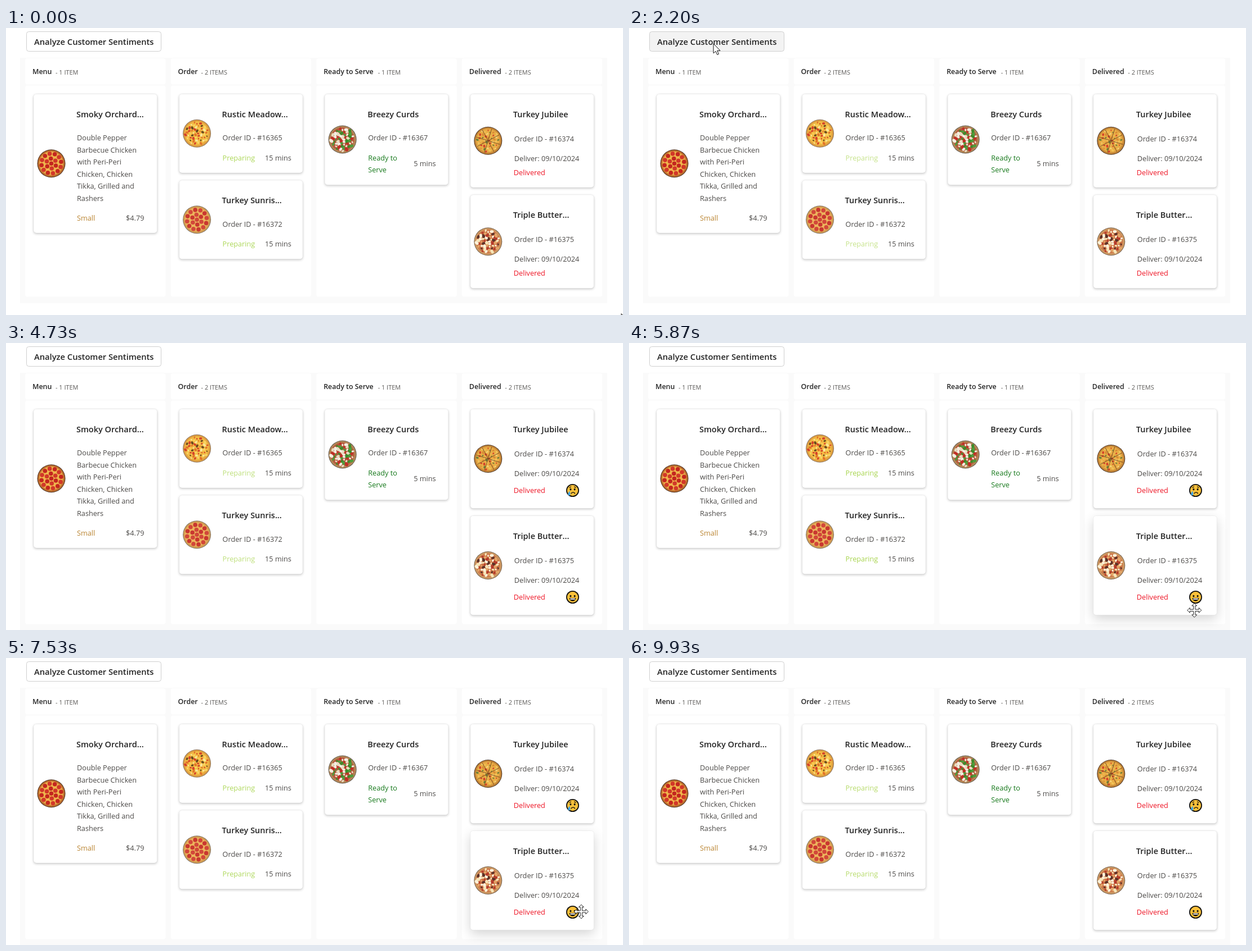
These frames come from a looping animation (1096x511 px, 10000 ms). An HTML page with a canvas:

```html
<!DOCTYPE html>
<html lang="en">
<head>
<meta charset="utf-8">
<title>Order board</title>
<style>
  html, body { margin: 0; width: 100%; height: 100%; overflow: hidden; background: #fff; }
  canvas { display: block; }
</style>
</head>
<body>
<canvas id="stage" width="1096" height="511"></canvas>
<script>
const ctx = document.getElementById('stage').getContext('2d');
const LOOP = 10000, ANALYZE_AT = 2300, RESULT_AT = 4500;
const FAMILY = '"Open Sans", "Noto Sans", sans-serif';
const INK = '#242424', BODY = '#4c4a48', LIME = '#9acd32', GREEN = '#17791c', RED = '#ee1525';
const COLUMN_STEP = 258.6, CARD_X = 49, CARD_W = 219.5;

const columns = [['Menu', '- 1 ITEM', 88], ['Order', '- 2 ITEMS', 88],
  ['Ready to Serve', '- 1 ITEM', 143.5], ['Delivered', '- 2 ITEMS', 110.5]];

// time, x, y of the pointer's hot spot
const pointerPath = [
  [0, 1094, 509], [600, 520, 320], [900, 230, 190], [1070, 170, 82], [1330, 175, 46],
  [1650, 150, 28], [2250, 150, 28], [2700, -20, 60], [2701, 1000, 560], [5700, 1000, 540],
  [5900, 1005, 465], [6200, 1010, 440], [6500, 1020, 275], [7000, 1020, 275],
  [7300, 1028, 440], [7600, 1020, 455], [7900, 1000, 540], [LOOP, 1000, 560]
];

function pointerAt(t) {
  const i = pointerPath.findIndex(p => p[0] > t);
  const [t0, x0, y0] = pointerPath[i - 1], [t1, x1, y1] = pointerPath[i];
  const k = (t - t0) / (t1 - t0);
  return { x: x0 + (x1 - x0) * k, y: y0 + (y1 - y0) * k };
}

const inside = (p, x, y, w, h) => p.x >= x && p.x <= x + w && p.y >= y && p.y <= y + h;

function box(x, y, w, h, r, fill, stroke) {
  ctx.beginPath();
  ctx.roundRect(x, y, w, h, r);
  if (fill) { ctx.fillStyle = fill; ctx.fill(); }
  if (stroke) { ctx.strokeStyle = stroke; ctx.lineWidth = 1; ctx.stroke(); }
}

function text(str, x, y, color = BODY, size = 12.7, weight = 400) {
  ctx.font = `${weight} ${size}px ${FAMILY}`;
  ctx.fillStyle = color;
  ctx.fillText(str, x, y);
}

function disc(x, y, r, fill, squash = 1, angle = 0) {
  ctx.beginPath();
  ctx.ellipse(x, y, r, r * squash, angle, 0, 7);
  ctx.fillStyle = fill;
  ctx.fill();
}

function outline(points, fill, stroke, width = 1) {
  ctx.beginPath();
  points.forEach(([x, y]) => ctx.lineTo(x, y));
  ctx.closePath();
  ctx.fillStyle = fill;
  ctx.fill();
  ctx.strokeStyle = stroke;
  ctx.lineWidth = width;
  ctx.stroke();
}

function shadow(color, blur, dy) {
  ctx.shadowColor = color;
  ctx.shadowBlur = blur;
  ctx.shadowOffsetY = dy;
}

const pizzas = {
  pepperoni: { rim: '#4b3226', crust: '#b9692b', cheese: '#efb54c', tops: ['#c4271f', '#d23829'], rings: true },
  salami: { rim: '#80766a', crust: '#d19a50', cheese: '#ecb45c', tops: ['#d2473a', '#c93730'], rings: true },
  corn: { rim: '#8c7765', crust: '#dd9d40', cheese: '#f3bd45',
    tops: ['#d5432a', '#fae69a', '#e2732a', '#6b4a20', '#f8d562'], count: 52, size: 3 },
  paneer: { rim: '#61574e', crust: '#b58a58', cheese: '#b5553a',
    tops: ['#f3eee0', '#3c8c2b', '#c02f25', '#e9dcc0', '#4f9c3c'], count: 54, size: 4 },
  sliced: { rim: '#4d382a', crust: '#c28336', cheese: '#e9ad45',
    tops: ['#d3402a', '#f4d073', '#71803a', '#d98a35', '#f1c258'], count: 44, size: 2.7, slices: true },
  cheesy: { rim: '#75604f', crust: '#cd9a63', cheese: '#cc7447',
    tops: ['#fbf3da', '#b53a2b', '#f6e5b8', '#5d3228', '#e3a668'], count: 52, size: 3.8 }
};

function drawPizza(kind, x, y) {
  const p = pizzas[kind];
  ctx.save();
  ctx.translate(x, y);
  disc(0, 0, 25, p.rim);
  disc(0, 0, 24, p.crust);
  const glow = ctx.createRadialGradient(-3, -4, 4, 0, 0, 22.5);
  glow.addColorStop(0, p.cheese);
  glow.addColorStop(.85, p.cheese);
  glow.addColorStop(1, p.crust);
  disc(0, 0, 22.5, glow);
  if (p.rings) {
    [[0, 1], [8.8, 6], [17.6, 12]].forEach(([r, n]) => {
      for (let i = 0; i < n; i++) {
        const a = i / n * Math.PI * 2 + r / 20;
        disc(r * Math.cos(a), r * Math.sin(a), 3.8, p.tops[i % 2]);
      }
    });
  } else {
    // golden-angle scatter
    for (let i = 0; i < p.count; i++) {
      const a = i * 2.4, r = 20.5 * Math.sqrt((i + .5) / p.count);
      const size = p.size * (.75 + .25 * Math.sin(i * 7.3));
      disc(r * Math.cos(a), r * Math.sin(a), size, p.tops[i * 7 % 11 % p.tops.length], .7, i);
    }
  }
  if (p.slices) {
    ctx.strokeStyle = '#704520';
    ctx.lineWidth = .9;
    ctx.beginPath();
    for (let i = 0; i < 4; i++) {
      const a = .3 + i * Math.PI / 4, dx = 22 * Math.cos(a), dy = 22 * Math.sin(a);
      ctx.moveTo(-dx, -dy);
      ctx.lineTo(dx, dy);
    }
    ctx.stroke();
  }
  ctx.restore();
}

function drawFace(x, y, happy) {
  ctx.save();
  ctx.translate(x, y);
  disc(0, 0, 11.5, '#15130f');
  disc(0, 0, 9.7, '#fbc13a');
  ctx.lineCap = 'round';
  ctx.strokeStyle = '#15130f';
  ctx.lineWidth = 1.4;
  [-3.6, 3.6].forEach(ex => disc(ex, -2, 1.5, '#15130f', 1.25));
  ctx.beginPath();
  if (happy) {
    ctx.arc(0, 1.5, 5.8, 0, Math.PI);
    ctx.closePath();
    ctx.fillStyle = '#15130f';
    ctx.fill();
    box(-4.4, 2.2, 8.8, 2, .8, '#fff');
  } else {
    ctx.arc(.8, 7, 3.6, Math.PI * 1.15, Math.PI * 1.85);
    [-1, 1].forEach(s => { ctx.moveTo(s * 5.5, -5.2); ctx.lineTo(s * 3, -6.5); });
    ctx.stroke();
    ctx.beginPath();
    ctx.moveTo(-5.5, 1);
    ctx.quadraticCurveTo(-10, 6.5, -7.2, 9);
    ctx.quadraticCurveTo(-2, 9.2, -5.5, 1);
    ctx.fillStyle = '#42a8e8';
    ctx.fill();
  }
  ctx.restore();
}

function drawCard(card, pointer, blink) {
  const { col, y, h, title, pizza, lines, face } = card;
  const x = CARD_X + col * COLUMN_STEP;
  const hovered = inside(pointer, x, y, CARD_W, h);
  ctx.save();
  if (hovered) shadow('rgba(0,0,0,.17)', 20, 7);
  else shadow('rgba(0,0,0,.22)', 4, 1.6);
  box(x, y, CARD_W, h, 5, '#fff');
  ctx.restore();
  box(x, y, CARD_W, h, 5, null, 'rgba(0,0,0,.05)');
  drawPizza(pizza, x + 31.5, y + h / 2);
  text(title, x + 76, y + 41, INK, 14.5, 600);
  lines.forEach(([str, dx, dy, color]) => {
    ctx.globalAlpha = color === LIME ? blink : 1;
    text(str, x + dx, y + dy, color);
    ctx.globalAlpha = 1;
  });
  if (face) drawFace(x + 181.7, y + 145, face === 'happy');
  return hovered;
}

function orderCard(y, title, pizza, id) {
  return { col: 1, y, h: 140.5, title, pizza,
    lines: [['Order ID - #' + id, 77, 82.7], ['Preparing', 77, 118, LIME], ['15 mins', 152.5, 118]] };
}

function deliveredCard(y, title, pizza, id, face) {
  return { col: 3, y, h: face ? 177 : 166.5, title, pizza, face,
    lines: [['Order ID - #' + id, 78, 84], ['Deliver: 09/10/2024', 78, 119],
      ['Delivered', 77, face ? 149 : 144, RED]] };
}

const description = ['Double Pepper', 'Barbecue Chicken', 'with Peri-Peri', 'Chicken, Chicken',
  'Tikka, Grilled and', 'Rashers'];

function cardsFor(done) {
  return [
    { col: 0, y: 117.5, h: 247.5, title: 'Smoky Orchard...', pizza: 'pepperoni',
      lines: [...description.map((str, i) => [str, 77, 82.7 + i * 21.5]),
        ['Small', 77, 225, '#b9832f'], ['$4.79', 164, 225]] },
    orderCard(117.5, 'Rustic Meadow...', 'corn', 16365),
    orderCard(271, 'Turkey Sunris...', 'salami', 16372),
    { col: 2, y: 117.5, h: 162, title: 'Breezy Curds', pizza: 'paneer',
      lines: [['Order ID - #16367', 77, 82.7], ['Ready to', 77, 118, GREEN],
        ['Serve', 77, 139.5, GREEN], ['5 mins', 158, 128.5]] },
    deliveredCard(117.5, 'Turkey Jubilee', 'sliced', 16374, done && 'sad'),
    deliveredCard(done ? 307.5 : 297, 'Triple Butter...', 'cheesy', 16375, done && 'happy')
  ];
}

function drawButton(t, busy, pointer) {
  if (!busy) {
    const hovered = inside(pointer, 36, 6, 240, 36);
    box(36.5, 6.5, 239, 35, 4, hovered ? '#f3f3f3' : '#fff', '#cfcfcf');
    text('Analyze Customer Sentiments', 50, 30.3, INK, 14.7, 600);
    return;
  }
  box(36.5, 6.5, 140, 35.7, 4, '#f1f1f1', '#c6c6c6');
  text('Analyzing...', 81, 30.5, INK, 14.7, 600);
  const turn = Math.PI * (1 + 2 * (t - 3330) / 1000);
  ctx.lineWidth = 1.5;
  [[0, 7, '#e6e6e6'], [turn, turn + 1.9, '#333']].forEach(([from, to, color]) => {
    ctx.beginPath();
    ctx.arc(58.5, 24.7, 8.7, from, to);
    ctx.strokeStyle = color;
    ctx.stroke();
  });
}

function drawBoard(done) {
  ctx.fillStyle = '#fafafa';
  ctx.fillRect(25, 53, 1043, done ? 470 : 437);
  columns.forEach(([name, count, countX], i) => {
    const dx = i * COLUMN_STEP;
    box(34 + dx, 54, 249.5, 46.5, 4, '#fff');
    box(34 + dx, 102.5, 249.5, done ? 398 : 376, 4, '#fff');
    text(name, 47 + dx, 82, INK, 12.4, 600);
    text(count, countX + dx, 82.5, '#5c5a58', 10.9, 500);
  });
}

function drawPointer({ x, y }, moving) {
  ctx.save();
  ctx.translate(x, y);
  if (moving) {
    const arm = [[-1.6, -1.6], [-1.6, -8], [-4.5, -8], [0, -12.5], [4.5, -8], [1.6, -8]];
    const cross = [];
    for (let q = 0; q < 4; q++) {
      const c = Math.round(Math.cos(q * Math.PI / 2)), s = Math.round(Math.sin(q * Math.PI / 2));
      arm.forEach(([px, py]) => cross.push([px * c - py * s, px * s + py * c]));
    }
    outline(cross, '#fff', '#222');
  } else {
    outline([[0, 0], [0, 17], [4, 13.4], [6.8, 19.6], [9.4, 18.4], [6.7, 12.4], [12, 12.2]], '#fff', '#111');
  }
  ctx.restore();
}

function draw(t) {
  const busy = t >= ANALYZE_AT && t < RESULT_AT, done = t >= RESULT_AT;
  const pointer = pointerAt(t);
  const blink = .7 + .18 * Math.cos(2 * Math.PI * (t - 1280) / 1500);
  ctx.fillStyle = '#fff';
  ctx.fillRect(0, 0, 1096, 511);
  drawButton(t, busy, pointer);
  ctx.save();
  ctx.translate(0, busy ? .7 : 0);
  drawBoard(done);
  const moving = cardsFor(done).map(card => drawCard(card, pointer, blink)).some(Boolean);
  ctx.restore();
  drawPointer(pointer, moving);
}

const start = performance.now();
function frame() {
  draw((performance.now() - start) % LOOP);
  requestAnimationFrame(frame);
}
frame();
</script>
</body>
</html>
```
